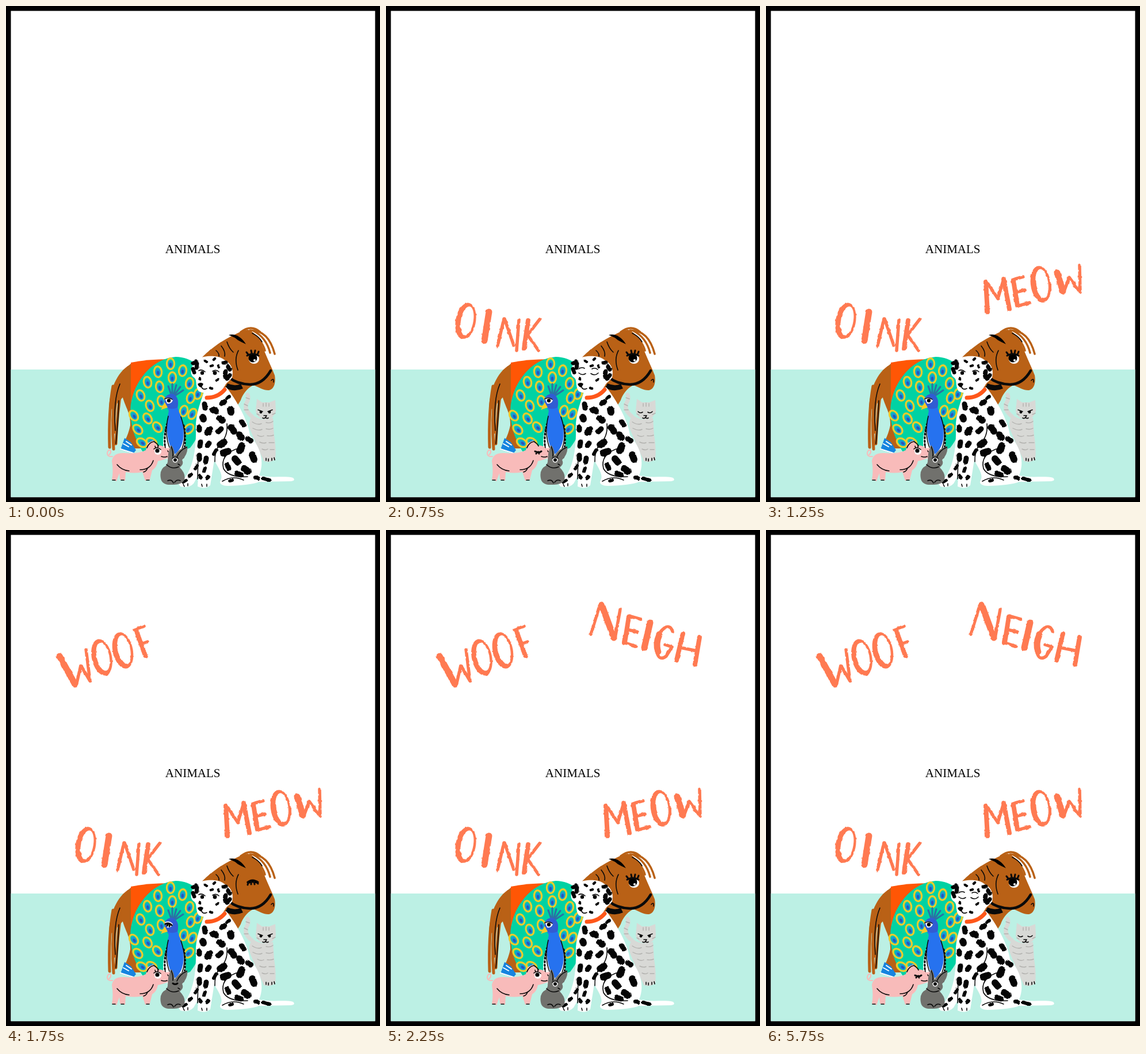
Write an HTML page that moves like this. It is 650 px wide and 861 px high and loops after 6000 ms.

```html
<!DOCTYPE html>
<html lang="en">
<head>
<meta charset="utf-8">
<title>Animals</title>
<style>
  html, body { margin: 0; width: 100%; height: 100%; overflow: hidden; background: #000; }
  svg { display: block; width: 100vw; height: 100vh; }
  path, ellipse { stroke-linecap: round; stroke-linejoin: round; }
  .title { font: 21px "Liberation Serif", "Times New Roman", serif; text-anchor: middle; }

  .line { fill: none; stroke: #0a0a0a; stroke-width: 1.6; }
  .bold { stroke-width: 3; }
  .brown { fill: #b96116; }
  .brown-line { fill: none; stroke: #b96116; stroke-width: 3.5; }
  .pink { fill: #f8bbba; }
  .gray { fill: #71716d; }
  .white { fill: #fff; }
  .cat { fill: #d8d9d6; }

  .word { fill: #ff7a52; }
  .word path { fill: none; stroke: #ff7a52; stroke-width: 5.5; }
  .word path.medium { stroke-width: 8; }
  .word path.thick { stroke-width: 11; }
  .word path.o { stroke: none; fill: #ff7a52; fill-rule: evenodd; }

  /* Every change is a hard cut within one 6 s loop. */
  .word, .open, .shut { animation: 6s step-end infinite; }
  .oink { animation-name: oink; }
  .meow { animation-name: meow; }
  .woof { animation-name: woof; }
  .neigh { animation-name: neigh; }
  @keyframes oink { 0% { opacity: 0 } 12.5%, 100% { opacity: 1 } }
  @keyframes meow { 0% { opacity: 0 } 20.8333%, 100% { opacity: 1 } }
  @keyframes woof { 0% { opacity: 0 } 29.1666%, 100% { opacity: 1 } }
  @keyframes neigh { 0% { opacity: 0 } 37.5%, 100% { opacity: 1 } }

  .early .open { animation-name: early-open; }
  .early .shut { animation-name: early-shut; }
  .late .open { animation-name: late-open; }
  .late .shut { animation-name: late-shut; }
  @keyframes early-open {
    0%, 12.5%, 33.3333%, 95.8333%, 100% { opacity: 1 }
    8.3333%, 29.1666%, 91.6666% { opacity: 0 }
  }
  @keyframes early-shut {
    0%, 12.5%, 33.3333%, 95.8333%, 100% { opacity: 0 }
    8.3333%, 29.1666%, 91.6666% { opacity: 1 }
  }
  @keyframes late-open {
    0%, 16.6666%, 37.5% { opacity: 1 }
    12.5%, 33.3333%, 95.8333%, 100% { opacity: 0 }
  }
  @keyframes late-shut {
    0%, 16.6666%, 37.5% { opacity: 0 }
    12.5%, 33.3333%, 95.8333%, 100% { opacity: 1 }
  }
</style>
</head>
<body>
<svg viewBox="0 0 650 861" preserveAspectRatio="none">
  <defs>
    <!-- The noise is made opaque so that it displaces evenly in all directions. -->
    <filter id="rough" filterUnits="userSpaceOnUse" x="0" y="0" width="650" height="861" color-interpolation-filters="sRGB">
      <feTurbulence type="fractalNoise" baseFrequency=".12" numOctaves="2" seed="4"/>
      <feColorMatrix values="1 0 0 0 0 0 1 0 0 0 0 0 1 0 0 0 0 0 0 1" result="noise"/>
      <feDisplacementMap in="SourceGraphic" in2="noise" scale="3" xChannelSelector="R" yChannelSelector="G"/>
    </filter>
    <path id="ring" class="o" d="M1-32A17.5 32 0 0 1-1 32A17.5 32 0 0 1 1-32ZM4-26A11 25 0 0 0 1 24A10.5 25 0 0 0 4-26Z"/>
  </defs>

  <rect width="650" height="861"/>
  <rect x="8.5" y="8.5" width="633" height="844" fill="#fff"/>
  <rect x="8.5" y="631" width="633" height="221.5" fill="#bcf0e4"/>
  <text class="title" x="324.7" y="429">ANIMALS</text>

  <g class="word oink"><g filter="url(#rough)">
    <use href="#ring" transform="translate(138.5 547) rotate(10)"/>
    <path class="thick" d="M179 531L171 581"/>
    <path d="M205 543L194 590M206 543L222 589M231 545L227 598"/>
    <path class="medium" d="M247 546L240 594"/>
    <path d="M267 544L246 571L265 598"/>
  </g></g>
  <g class="word meow"><g filter="url(#rough)">
    <path class="medium" d="M382 479L385 531M413 474L423 526"/>
    <path d="M383 478L403 508L413 474"/>
    <path class="medium" d="M430 477L437 520"/>
    <path d="M429 475L447 470M434 497L450 493M437 521L458 515"/>
    <use href="#ring" transform="translate(477.5 483) rotate(-8)"/>
    <path class="thick" d="M506 463L516 495"/>
    <path d="M517 498L527 471L546 497L545 450"/>
  </g></g>
  <g class="word woof"><g filter="url(#rough)">
    <path class="thick" d="M93 219L120 268"/>
    <path d="M122 270L130 235L146 262L139 207"/>
    <use href="#ring" transform="translate(166.5 221) rotate(-12)"/>
    <use href="#ring" transform="translate(203 209) rotate(-12)"/>
    <path class="medium" d="M227 176L242 218"/>
    <path d="M223 173L240 167M235 198L246 194"/>
  </g></g>
  <g class="word neigh"><g filter="url(#rough)">
    <path d="M372 129L356 181M407 138L398 188"/>
    <path class="thick" d="M375 130L396 187"/>
    <path class="medium" d="M422 151L415 195"/>
    <path d="M422 149L443 155M420 173L437 177M416 196L435 202"/>
    <path class="thick" d="M459 161L449 204"/>
    <path d="M498 176Q494 164 484 170Q466 184 470 209Q474 229 487 219L497 203L485 199"/>
    <path class="thick" d="M475 182Q468 198 473 211"/>
    <path class="medium" d="M516 180L505 226M545 186L537 233"/>
    <path d="M511 204L541 210"/>
  </g></g>

  <g class="early">
    <!-- horse -->
    <path class="brown" d="M220 620C195 632 182 660 179 695L184 700L206 676Z"/>
    <path class="brown-line" style="stroke-width:5" d="M186 660Q178 705 180 766M190 665Q183 720 187 769M196 660Q186 705 188 740M201 660Q193 705 191 760"/>
    <path class="brown" d="M219 619C202 633 196 658 203 680C208 697 217 708 216 728Q213 742 207 754L222 768H255V619Z"/>
    <path class="line" d="M198 656Q186 684 190 737M196 685Q195 720 191 760"/>
    <path d="M206 750L217 757L226 771L221 777L199 770Z" fill="#1684df"/>
    <path d="M199 769L221 776M204 760L213 765M209 756L218 762" fill="none" stroke="#fff" stroke-width="2"/>
    <path d="M217 619Q245 613 285 613L270 650L217 688Z" fill="#ff5605"/>
    <path class="brown" d="M338 613C350 599 372 583 390 574C402 569 410 562 421 562C434 568 443 583 449 599C455 614 462 628 467 641C469 652 467 665 457 667C449 668 440 662 430 658C418 664 411 675 408 684Q404 692 396 700L380 690L345 630Z"/>
    <path class="brown-line" d="M408 566Q426 552 442 566M424 563Q456 562 467 604M430 564Q452 575 459 602M424 565Q445 580 450 598M348 607l8-9M366 592l8-7"/>
    <path class="line" d="M365 598q6 5 5 10M374 590q8 10 6 18M384 583q4 12 11 18M404 598Q396 613 403 632M428 568q12 6 17 15"/>
    <path d="M387 571Q404 567 417 587Q408 583 403 580L398 576Z"/>
    <path class="line" style="stroke-width:4.5" d="M460 633Q446 657 424 657Q401 656 388 645"/>
    <path class="line" style="stroke-width:9;stroke-linecap:butt" d="M383 659Q397 666 410 660"/>
    <path class="line" d="M461 650q5-5 4 3"/>
    <g class="open">
      <ellipse class="white" cx="431" cy="613" rx="9" ry="8"/>
      <circle cx="429" cy="611" r="7.5"/>
      <circle class="white" cx="432" cy="615" r="2"/>
      <path class="line bold" d="M419 607Q429 601 439 607M421 605l-3-4M427 603l-1-5M432 603l1-5M437 605l2-5"/>
    </g>
    <g class="shut">
      <path d="M418 611Q428 602 440 611L437 614Q427 610 420 615Z"/>
      <path class="line bold" d="M421 611l-1 5M426 610v5M431 610l1 5M436 610l2 4"/>
    </g>

    <!-- peacock -->
    <path d="M295 609C322 609 348 628 350 662C349 708 340 742 320 767L300 774H238C218 745 212 705 219 681C228 646 256 612 295 609Z" fill="#00d2a3"/>
    <g id="feathers"></g>
    <path class="white" d="M284 712Q270 742 274 772L283 793L311 781Q315 745 303 712Z"/>
    <path class="line bold" stroke-dasharray="2 4" d="M280 725Q273 748 278 782M309 728Q314 750 308 784"/>
    <path class="line" stroke-dasharray="3 4" d="M277 734Q272 760 283 785"/>
    <path d="M288 677l-6-17M289 676v-20M291 676l5-18M292 676l11-15M293 677l15-10" fill="none" stroke="#2b71a5" stroke-width="3"/>
    <path d="M276 690C273 677 284 672 291 674C300 679 300 689 298 696Q300 704 304 712C313 744 309 765 294 778C281 764 276 734 283 703Z" fill="#2672ef"/>
    <path d="M276 690C273 677 284 672 291 674C300 679 300 689 298 697Q290 701 282 698Z" fill="#315cd3"/>
    <path class="line" d="M282 712Q275 742 284 766M304 713Q315 745 306 768"/>
    <path d="M276 688L269 701L281 697Z" fill="#f8c927"/>
    <path class="white" d="M276 681Q284 677 290 684Q288 691 280 690Z"/>
    <g class="open"><circle cx="283" cy="685" r="3.2"/><path class="line" d="M276 682q7-4 13 1"/></g>
    <path class="line bold shut" d="M277 684q6-3 11 2m-7-2l-1 3m4-3v4"/>
  </g>

  <g class="late">
    <!-- cat -->
    <path d="M427 712Q413 701 418 689Q423 681 420 675" fill="none" stroke="#d8d9d6" stroke-width="7"/>
    <path class="cat" d="M436 682L445 688H458L468 684L469 703Q464 719 451 718Q436 716 434 703Z"/>
    <path class="cat" d="M430 711Q446 722 464 715L466 745Q470 770 468 787Q458 794 448 790Q439 770 425 737Q419 719 430 711Z"/>
    <path d="M447 690v5M452 689v6M457 690v5M436 708l4 2M468 707l-5 2M417 680l6 2M414 691l6 3M414 701l7 0M428 722q9 6 16 3M452 723q7 2 12-2M429 733q9 5 16 2M452 734q7 2 12-1M437 745q6 4 11 1M454 746q6 1 11-1M441 757q6 3 11 1M457 758h9M445 769q6 3 10 0M459 770h7" fill="none" stroke="#b2b2af" stroke-width="1.4"/>
    <path class="line" d="M448 711h5l-2 3q-2 3-5 1m5-1q2 3 5 1M452 785v4M456 786v4M462 785v4M466 784l1 4"/>
    <g class="open">
      <path class="line" d="M438 701l8 3M463 701l-8 3"/>
      <circle cx="443" cy="705" r="2.4"/><circle cx="458" cy="705" r="2.4"/>
    </g>
    <path class="line shut" d="M438 704q4 4 8 1M455 705q4 3 8-1"/>

    <!-- dog -->
    <path class="white" d="M345 666L383 662C400 683 421 720 424 745C444 768 449 793 440 815C460 820 485 815 499 819Q504 824 495 825L440 826Q425 832 385 833Q368 832 373 823C379 813 366 798 362 788L355 832Q346 840 333 834L334 815L326 829Q317 838 303 834Q295 826 311 819C325 800 330 770 330 740C328 710 338 690 345 666Z"/>
    <path class="white" d="M333 613C345 606 370 606 379 614C392 620 396 632 393 645C388 652 384 652 380 660C372 672 345 674 335 669C328 658 333 650 327 645C318 640 320 625 333 613Z"/>
    <g filter="url(#rough)" fill="none" stroke="#050505">
      <path stroke-width="12" d="M360 701l4 2M390 700l1 5M371 716l5 3M342 714l1 3M354 735l-3 5M391 732l5 6M379 757l-7 5M406 744l3 5M386 773l-9 3M410 763l-4 9M398 786l5 6M428 779l3 8M414 803l6 5"/>
      <path stroke-width="9" d="M345 691l1 7M375 690l5-3M336 731v5M369 739l5-5M410 722l3 5M350 763l3-4M338 757l-1 7M420 751l5 4M348 785l-1 6M336 780v6M385 797l2 6M408 814l-7-3"/>
      <path stroke-width="6" d="M384 681l4-3M365 771l-4 7M332 798l-3 5M346 802l-2 6M337 815l2 4M322 813l-3 3M351 817l-2 3M313 823l-5 3M432 818l7 2M389 824l4-1M447 820l11 3"/>
      <path stroke-width="7" d="M326 620l4-3M325 630l2 6M332 621l-1 7M378 619l4 0M386 626l3 5M382 634l-1 10M389 641l-5 6"/>
      <path stroke-width="4.5" d="M346 616l3 2M361 614l2-2M356 625l3-1M369 624l1 3M336 646l1 2M366 650l3-2M355 663l3 1"/>
    </g>
    <path class="line" d="M384 725Q386 748 372 759Q362 774 363 791M400 769Q372 780 378 803Q387 819 420 817M376 825Q394 814 413 823M334 778l-1 43M308 830l2 4M316 829v4M340 830l1 4M349 830v4"/>
    <path d="M349 680Q368 680 380 666" fill="none" stroke="#ff571a" stroke-width="7"/>
    <path d="M333 656q6-4 10 0l-3 6q-5 0-7-6Z"/>
    <path class="line" d="M340 662q3 5 9 2"/>
    <g class="open">
      <path class="line" d="M335 633q5-3 11 2M359 634q6-4 11 1"/>
      <circle cx="341" cy="637" r="3.2"/><circle cx="363" cy="637" r="3.4"/>
    </g>
    <path class="line shut" d="M335 637q6 5 12 1M356 638q7 5 13-1M335 630q5-4 10-1M358 630q5-3 10 1"/>

    <!-- pig -->
    <path d="M185 782q-9 1-9-6q1-6 5-5q3 4-2 8" fill="none" stroke="#f8bbba" stroke-width="2"/>
    <path class="pink" d="M184 790Q186 775 205 776Q230 778 243 771L246 759L256 754L263 763Q272 762 278 768L285 767Q289 776 284 783Q275 788 264 790Q262 801 254 806L250 822L242 824L237 809Q222 812 208 809L207 824L198 822L197 811L192 825L184 822Q187 808 184 790Z"/>
    <path class="line" d="M245 767q3-9 12-11q7 4 8 8M193 796q8 10 21 11M233 805q18 0 23-16M239 809q5-1 7-7M185 823h5M200 823h5M244 823h5M281 772l1 2M283 777v2M270 782q6 2 10 0"/>
    <g class="open">
      <circle class="white" cx="264" cy="773" r="6"/>
      <circle cx="263" cy="772" r="3.6"/>
      <path class="line" d="M257 769q6-5 12 1M260 767l-1-3M264 766v-3"/>
    </g>
    <path class="line bold shut" d="M259 773q6 4 11 0m-8 1l-1 3m4-3l1 3"/>
  </g>

  <!-- rabbit -->
  <g class="early">
    <path class="gray" d="M281 792Q281 775 287 762Q293 769 293 780Q302 767 315 764Q317 777 306 788Q310 795 302 801Q313 812 310 823Q304 832 288 831Q271 832 269 820Q266 804 278 798Z"/>
    <path class="line" d="M287 765q4 8 3 17M314 766q-12 5-17 17M279 796q9 9 21 4M281 824q7-3 10 4M293 827q4-6 10-3M299 795l3 2"/>
    <g class="open">
      <circle class="white" cx="294" cy="788" r="4.5"/>
      <circle cx="294" cy="788" r="3"/>
      <path class="line" d="M289 785q5-4 10 0"/>
    </g>
    <path class="line bold shut" d="M290 787q4 3 8 0"/>
  </g>
</svg>
<script>
  // Peacock feather eyes fan out from the base of the tail.
  const base = { x: 287, y: 738 };
  const spots = [
    [286, 621], [264, 635], [307, 633], [246, 653], [267, 661], [289, 645],
    [234, 676], [319, 655], [334, 673], [222, 711], [250, 694], [270, 686],
    [321, 680], [246, 716], [229, 735], [263, 731], [253, 757], [236, 758],
    [309, 703], [324, 708], [318, 734]
  ];
  const oval = (rx, ry, dy, style) => `<ellipse rx="${rx}" ry="${ry}" cy="${dy}" ${style}/>`;
  document.getElementById("feathers").innerHTML = spots.map(([x, y]) => {
    const turn = Math.atan2(x - base.x, base.y - y) * 180 / Math.PI * .5;
    return `<g transform="translate(${x} ${y}) rotate(${turn})">` +
      oval(6.6, 9.4, 0, 'fill="#00d2a3" stroke="#edcb2d" stroke-width="3.2"') +
      oval(4.4, 6.4, 1, 'fill="#159ad6"') +
      oval(2.2, 3.4, 2, 'fill="#2856bb"') + "</g>";
  }).join("");
</script>
</body>
</html>
```
